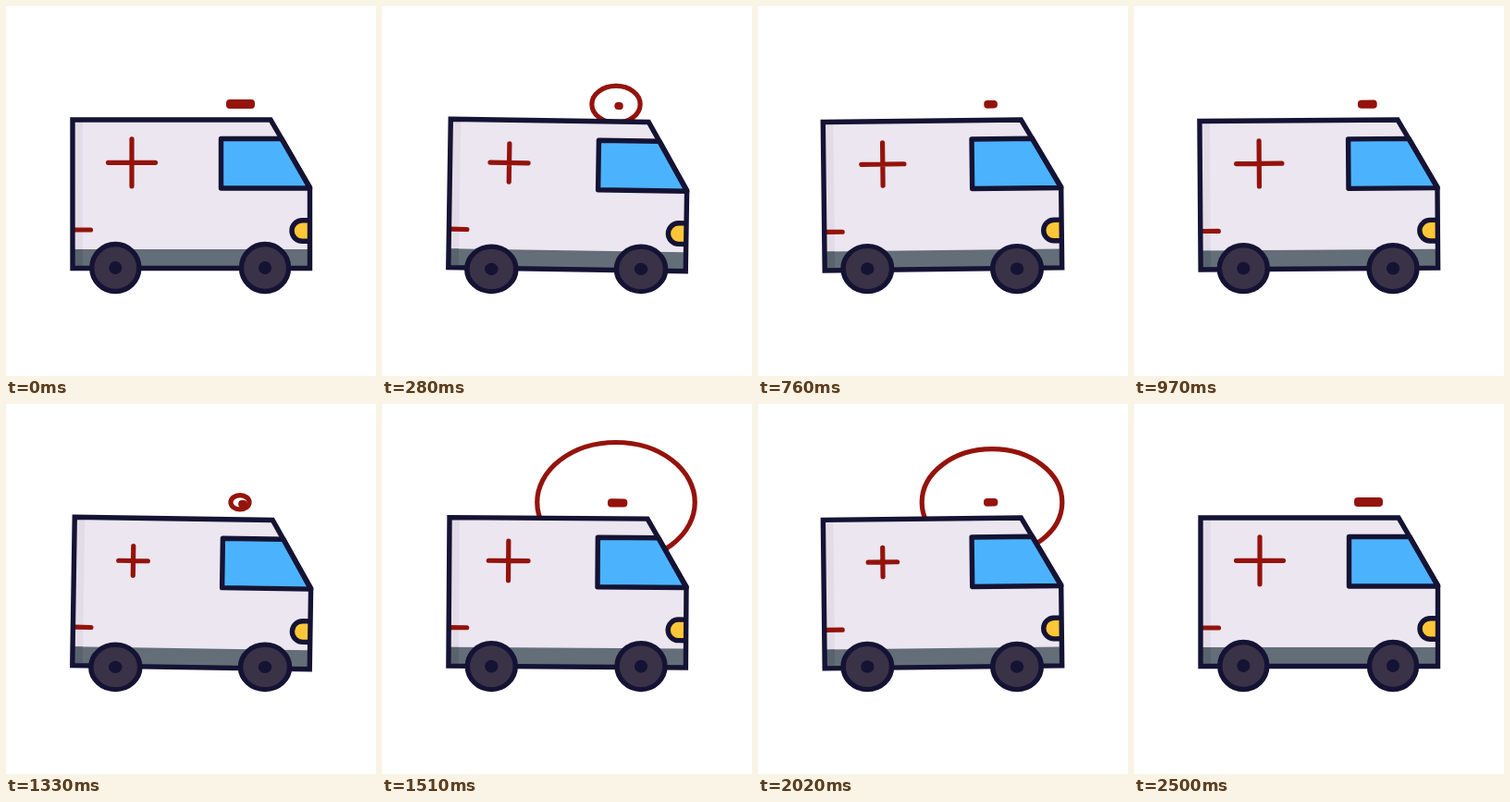
An HTML page that plays this animation: 400 by 400 pixels, repeating every 2.59 s.

```html
<!DOCTYPE html>
<html lang="en">
<head>
<meta charset="utf-8">
<title>Ambulance</title>
<style>
  html, body { margin: 0; width: 100%; height: 100%; overflow: hidden; background: #fff; }
  svg { display: block; width: 100vw; height: 100vh; }
  .line { fill: none; stroke: #151334; stroke-width: 5.4; }
  .red { fill: none; stroke: #94130c; stroke-width: 5.2; stroke-linecap: round; }
  .tire { fill: #3a3347; stroke: #151334; stroke-width: 5.4; }
  .hub { fill: #151334; }
</style>
</head>
<body>
<svg viewBox="0 0 400 400">
  <ellipse id="ring" class="red" cx="253" cy="106.3"/>
  <g id="body">
    <rect id="siren" fill="#94130c"/>
    <path fill="#ebe6ef" d="M72 123H286L328.5 196V283.5H72Z"/>
    <path fill="#646e78" d="M72 263H328.5V283.5H72Z"/>
    <path fill="#e3dce7" d="M72 123H83V263H72Z"/>
    <path fill="#59636e" d="M72 263H83V283.5H72Z"/>
    <path class="red" d="M74 242H91.5"/>
    <path id="cross" class="red"/>
    <path class="line" fill-rule="evenodd" style="fill:#ffc738" d="M328.5 231.7H320.3A11.3 11.3 0 0 0 320.3 254.3H328.5"/>
    <path class="line" style="fill:#4bb3fd" stroke-linejoin="round" d="M232.5 143.5H298L328.5 197H232.5Z"/>
    <path class="line" d="M72 123H286L328.5 196V283.5H72Z"/>
  </g>
  <g class="wheel" data-x="118.3">
    <circle class="tire" r="25.5"/><circle class="hub" r="7"/>
  </g>
  <g class="wheel" data-x="280">
    <circle class="tire" r="25.5"/><circle class="hub" r="7"/>
  </g>
</svg>
<script>
const LOOP = 2590, STEP = 30, HOLD = 130, LAST = 80;
const RISE = 5.8, BEAT = LAST / 3;

// Each jolt: start, end, lean direction, start of its siren wave
const jolts = [
  [0, 17.7, 1, 4.4],
  [17.7, 35.4, -1, 22],
  [35.4, 53.2, 1, 40.4],
  [53.2, 80, -1, 58.6]
];
const WAVE = 6.8;

const $ = id => document.getElementById(id);
const ring = $('ring'), body = $('body'), siren = $('siren'), cross = $('cross');
const wheels = [...document.querySelectorAll('.wheel')];

function set(el, attrs) {
  for (const name in attrs) el.setAttribute(name, attrs[name]);
}

function jolt(k) {
  const [start, end, side] = jolts.find(j => k < j[1]) || jolts[jolts.length - 1];
  const p = k - start;
  const force = p < RISE
    ? p / RISE
    : Math.pow(Math.max(0, 1 - (p - RISE) / (end - start - RISE)), 1.25);
  return { force, side };
}

function waveRadius(k) {
  const j = jolts.find(j => k >= j[3] && k < j[3] + WAVE);
  return j ? 86 * (1 - Math.pow(1 - (k - j[3]) / WAVE, 1.35)) : 0;
}

function crossHalf(k) {
  const p = (k / BEAT) % 1, low = 0.46;
  const angle = p < low ? p / low : 1 + (p - low) / (1 - low);
  return 20.4 + 5.1 * Math.cos(Math.PI * angle);
}

function draw(t) {
  const k = t < HOLD ? 0 : Math.min(LAST, Math.floor((t - HOLD) / STEP) + 1);
  const { force, side } = jolt(k);

  // The body leans over one wheel or the other
  const pivot = side > 0 ? 125 : 280;
  set(body, { transform: `rotate(${side * force * 0.92} ${pivot} 268)` });

  const w = 31 - 22 * force, h = 10 - 2 * force;
  set(siren, { x: 253.5 - w / 2, y: 106 - h / 2, width: w, height: h, rx: 4 });

  const r = waveRadius(k);
  set(ring, { rx: r, ry: r * 0.76, visibility: r ? 'visible' : 'hidden' });

  const c = crossHalf(k);
  set(cross, { d: `M${136 - c} 169.3H${136 + c}M136 ${169.3 - c}V${169.3 + c}` });

  for (const wheel of wheels) {
    const sx = 1 + 0.04 * force, sy = 1 - 0.05 * force;
    set(wheel, { transform: `translate(${wheel.dataset.x} ${311.2 - 28.2 * sy}) scale(${sx} ${sy})` });
  }
}

const origin = performance.now();
function tick() {
  draw((performance.now() - origin) % LOOP);
  requestAnimationFrame(tick);
}
tick();
</script>
</body>
</html>
```
